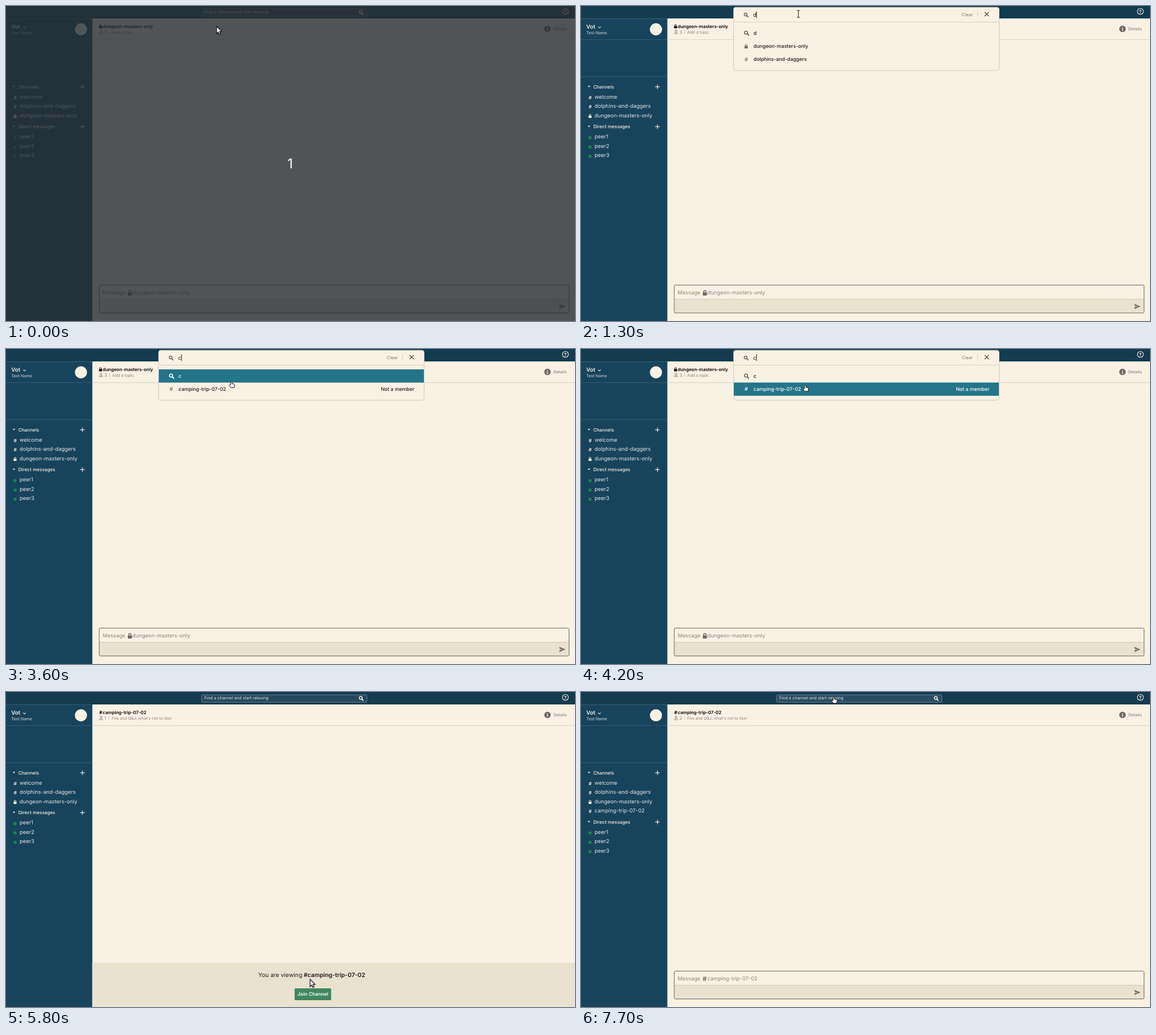
An HTML page for the animation above (8000 ms loop, 1005 by 557 pixels).

```html
<!DOCTYPE html>
<html lang="en">
<head>
<meta charset="utf-8">
<title>Channel search</title>
<style>
  html, body { margin: 0; width: 100%; height: 100%; overflow: hidden; background: #f9f1e4; }
  svg { display: block; width: 1005px; height: 557px; }
  text { font-family: Inter, "Open Sans", sans-serif; text-rendering: geometricPrecision; white-space: pre; }
</style>
</head>
<body>
<svg id="stage" viewBox="0 0 1005 557" xmlns="http://www.w3.org/2000/svg">
  <defs>
    <g id="lock">
      <rect x="-2.6" y="-.6" width="5.2" height="4" rx=".6" fill="currentColor"/>
      <path d="M-1.5 0V-1.5a1.5 1.5 0 0 1 3 0V0" fill="none" stroke="currentColor"/>
    </g>
    <g id="lens" fill="none" stroke="currentColor" stroke-width="1.5">
      <circle cx="-.9" cy="-.9" r="2.5"/>
      <path d="M1 1L3.8 3.8" stroke-width="1.8"/>
    </g>
    <path id="plus" d="M-4 0H4M0-4V4" stroke="#e6e6e2" stroke-width="1.2"/>
    <path id="caretDown" d="M-2.3-1.2H2.3L0 1.3Z" fill="#f4eee2"/>
    <path id="arrow" d="M0 0V12.8L3 10 5 14.4 7.2 13.4 5.2 9.2H9Z" fill="#fff" stroke="#111" stroke-width="1.2"/>
    <path id="hand" d="M-1.2 6.5V1.2Q0-.6 1.2 1.2V4.2L5 5Q6 5.3 5.8 6.6L5 11.4H-.6L-3.9 7.6Q-3.6 6-2.4 6.4Z" fill="#fff" stroke="#111"/>
    <path id="beam" d="M-2.5-6.5Q0-6.5 0-5Q0-6.5 2.5-6.5M0-5V5M-2.5 6.5Q0 6.5 0 5Q0 6.5 2.5 6.5" fill="none" stroke="#111"/>
  </defs>
  <g id="scene"></g>
</svg>
<script>
const LOOP = 8000, STEP = 100;
const CREAM = '#f9f1e4', SAND = '#eae2d1', GREY = '#8b867d', DARK = '#6f6a63', INK = '#1d1d1d';
const TRIP = 'camping-trip-07-02', MASTERS = 'dungeon-masters-only', TALES = 'dolphins-and-daggers';

// Pointer: time, x, y, shape
const path = [
  [0, 372, 36, 'arrow'], [200, 372, 36, 'arrow'], [300, 375, 26, 'arrow'], [500, 379, 13, 'hand'],
  [700, 383, 9, 'hand'], [900, 383, 9, 'hand'], [1000, 384, 14, 'beam'], [1800, 384, 14, 'beam'],
  [2000, 386, 16, 'beam'], [2400, 386, 16, 'beam'], [2500, 399, 56, 'arrow'], [2600, 398, 57, 'hand'],
  [3900, 398, 57, 'hand'], [4000, 397, 61, 'hand'], [4200, 396, 63.5, 'hand'], [4500, 393, 68, 'hand'],
  [4900, 393, 68, 'hand'], [5000, 390, 69, 'arrow'], [5100, 405, 92, 'arrow'], [5400, 595, 331, 'arrow'],
  [5500, 595, 331, 'arrow'], [5600, 582, 390, 'arrow'], [5800, 537, 508, 'arrow'], [6000, 523, 537, 'hand'],
  [6400, 523, 537, 'hand'], [6500, 523, 537, 'arrow'], [6900, 492, 270, 'arrow'], [7300, 452, 34, 'arrow'],
  [7400, 448, 18, 'arrow'], [7500, 446, 8, 'arrow'], [7600, 446, 8, 'arrow'], [7700, 446.5, 8.5, 'hand'],
  [LOOP, 446.5, 8.5, 'hand']
];

const text = (x, y, size, fill, str, weight = 400, extra = '') =>
  `<text x="${x}" y="${y}" font-size="${size}" fill="${fill}" font-weight="${weight}" ${extra}>${str.replace(/&/g, '&amp;')}</text>`;
const rect = (x, y, w, h, fill, extra = '') =>
  `<rect x="${x}" y="${y}" width="${w}" height="${h}" fill="${fill}" ${extra}/>`;
const line = (d, color, width = 1) =>
  `<path d="${d}" fill="none" stroke="${color}" stroke-width="${width}"/>`;
const circle = (x, y, r, fill, extra = '') =>
  `<circle cx="${x}" cy="${y}" r="${r}" fill="${fill}" ${extra}/>`;
const icon = (id, x, y, color = '#000', scale = 1) =>
  `<use href="#${id}" transform="translate(${x} ${y}) scale(${scale})" color="${color}"/>`;
const middle = 'text-anchor="middle"';

function topBar(t) {
  const hover = (t >= 500 && t < 1000) || t >= 7400;
  return rect(0, 0, 1005, 22, '#143b4f') +
    rect(345.5, 5, 292, 13, hover ? '#294c60' : '#26485c', 'rx="2" stroke="#71899a" stroke-width=".9"') +
    text(350, 13.4, 7.4, '#e2e4e0', 'Find a channel and start relaxing') +
    icon('lens', 627.5, 11.5, '#f4eee2') +
    circle(988, 9.5, 5.3, 'none', 'stroke="#f4eee2" stroke-width="1.1"') +
    text(988, 12.6, 8.5, '#f4eee2', '?', 700, middle);
}

function sidebar(joined) {
  const pale = '#e3e5e2', rule = '#3d6278';
  const channels = ['welcome', TALES, MASTERS].concat(joined ? [TRIP] : []);
  const shift = joined ? 16.5 : 0;
  let s = rect(0, 22, 152.5, 535, '#18435d') +
    [22.5, 59.5, 125].map(y => line(`M0 ${y}H152.5`, rule, .9)).join('') +
    text(9.3, 40, 9.8, '#f4eee2', 'Vot', 600) +
    line('M30.3 36.7L32.6 38.8 34.9 36.7', '#f4eee2', 1.1) +
    text(9.2, 50.3, 7.3, '#cfd6d8', 'Test Name') +
    circle(132.4, 41.3, 10.7, CREAM);
  [['Channels', 142.8], ['Direct messages', 213.3 + shift]].forEach(([label, y]) => {
    s += icon('caretDown', 14, y - .3) + text(21.7, y + 3, 8.2, '#f4eee2', label, 500) + icon('plus', 135, y);
  });
  channels.forEach((name, i) => {
    const y = 160.7 + i * 16.4;
    s += text(24, y + 3.3, 9.4, pale, name) +
      (name === MASTERS ? icon('lock', 16, y + 1, '#f4eee2') : text(16.2, y + 4, 8.4, '#f4eee2', '#', 600, middle));
  });
  for (let i = 0; i < 3; i++) {
    const y = 231 + shift + i * 16.5;
    s += circle(16, y + 1.8, 2.8, '#188747') + text(24, y + 3.3, 9.4, pale, 'peer' + (i + 1));
  }
  return s;
}

function header(t) {
  const trip = t >= 4900, count = !trip ? '3' : t < 6500 ? '1' : '2';
  const dx = count === '1' ? -1 : 0;
  return line('M152.5 59.5H1005', '#d9d2c6') +
    (trip ? text(164.7, 38.5, 8, '#000', '#', 700) : icon('lock', 167, 36, '#000')) +
    text(170.8, 38.5, 7.95, '#000', trip ? TRIP : MASTERS, 600) +
    circle(167.8, 44, 1.7, 'none', `stroke="${GREY}" stroke-width=".9"`) +
    line('M165 49V48.4Q165 46.7 167.8 46.7T170.6 48.4V49Z', GREY, .9) +
    text(173.7, 49, 8, GREY, count) + line(`M${183 + dx} 42.5V49.5`, '#c3bcb0', .9) +
    text(187.6 + dx, 48.6, 7.1, GREY, trip ? "Fire and Q&J, what's not to like!" : 'Add a topic.') +
    circle(956.4, 40.5, 5.7, DARK) + text(956.4, 43.6, 8.5, CREAM, 'i', 800, middle) +
    text(966.8, 43, 7.3, GREY, 'Details', 500);
}

function composer(trip) {
  return rect(165, 518, 829, 25, SAND) + line('M165 518.5H994', '#cfc7b8', .9) +
    rect(164.7, 493.5, 829.8, 49.3, 'none', 'rx="2" stroke="#68645e"') +
    text(170.8, 509.8, 9.3, GREY, 'Message') +
    (trip ? text(214.8, 510.5, 11, DARK, '#', 700) : icon('lock', 218.8, 507.2, DARK, 1.4)) +
    text(223.3, 509.8, 9.4, GREY, trip ? TRIP : MASTERS) +
    '<path d="M977 526.5L988.3 531.3 977 536 978.3 532 984 531.3 978.3 530.5Z" fill="#79736b"/>';
}

function joinPanel() {
  return rect(152.5, 479, 852.5, 78, SAND) +
    text(445.4, 504.3, 10.4, INK, 'You are viewing') +
    text(525.7, 504.3, 10.5, INK, '#' + TRIP, 600) +
    rect(509.7, 524, 64.6, 21, '#408661', 'rx="1.5"') +
    text(542, 536.8, 8.6, '#fff', 'Join Channel', 600, middle);
}

function dialog(t) {
  const query = t >= 1200 && t < 2800 ? 'd' : t >= 3600 ? 'c' : '';
  const rows = {
    '': [['lock', MASTERS], ['#', TALES]],
    d: [['lens', 'd'], ['lock', MASTERS], ['#', TALES]],
    c: [['lens', 'c'], ['#', TRIP, 'Not a member']]
  }[query];
  const active = t >= 4000 ? 1 : t >= 3600 || (t >= 2500 && t < 2800) ? 0 : -1;
  const caret = t < 1400 || (t >= 2800 && t < 3200) || t >= 3600;
  let s = rect(269.5, 2.3, 469, 41.5 + rows.length * 23.4, CREAM, 'rx="4" stroke="#d2cabd"') +
    icon('lens', 291.7, 16, DARK) + text(304, 19, 9.5, INK, query) +
    (caret ? line(`M${query ? 310 : 304.5} 9.5V21`, '#111') : '') +
    text(672.8, 17.7, 7.7, '#7d776f', 'Clear') + line('M700.5 10V18.5', '#d2cabd') +
    line('M713 11L720 18M720 11L713 18', '#4a4743', 1.2) + line('M270 28.5H738', '#d8d0c3');
  rows.forEach(([mark, label, note], i) => {
    const y = 36 + i * 23.3, on = i === active;
    const ink = on ? '#fff' : INK, tint = on ? '#fff' : DARK;
    if (on) s += rect(270, y, 468, 23.4, '#24758a');
    s += (mark === '#' ? text(291.7, y + 15, 9.5, tint, '#', 500, middle)
      : icon(mark, mark === 'lock' ? 291.7 : 292.5, y + 12, tint, 1.1)) +
      text(304.8, y + 14.7, 8.75, ink, label, 500);
    if (note) s += text(721.3, y + 14.7, 8.75, ink, note, 500, 'text-anchor="end"');
  });
  return s;
}

function linkHint() {
  return '<path d="M-1 543.5H121Q124 543.5 124 546.5V558H-1Z" fill="#f8f3ea" stroke="#c9c4bb"/>' +
    text(3.4, 554.7, 10.8, '#4a4a4a', 'localhost:3000/#/c/199', 400, 'style="font-family:\'Open Sans\',\'Noto Sans\',sans-serif"');
}

function pointer(t) {
  const i = path.findIndex((p, k) => t >= p[0] && t < path[k + 1][0]);
  const [t0, x0, y0, shape] = path[i], [t1, x1, y1] = path[i + 1];
  const k = (t - t0) / (t1 - t0);
  return icon(shape, x0 + (x1 - x0) * k, y0 + (y1 - y0) * k);
}

function draw(t) {
  const viewing = t >= 4900 && t < 6500;
  return rect(0, 0, 1005, 557, CREAM) + topBar(t) + sidebar(t >= 6500) + header(t) +
    (viewing ? joinPanel() : composer(t >= 6500)) +
    (t >= 1000 && t < 4900 ? dialog(t) : '') +
    (t >= 4400 && t < 5200 ? linkHint() : '') +
    (t < 300 ? rect(0, 0, 1005, 557, '#262e31', 'opacity=".8"') + text(502, 287, 24, '#fff', '1', 400, middle) : '') +
    pointer(t);
}

const scene = document.getElementById('scene');
const start = performance.now();
let last = -1;
function tick(now) {
  const t = Math.floor(Math.max(0, now - start) % LOOP / STEP) * STEP;
  if (t !== last) scene.innerHTML = draw(last = t);
  requestAnimationFrame(tick);
}
tick(start);
</script>
</body>
</html>
```
